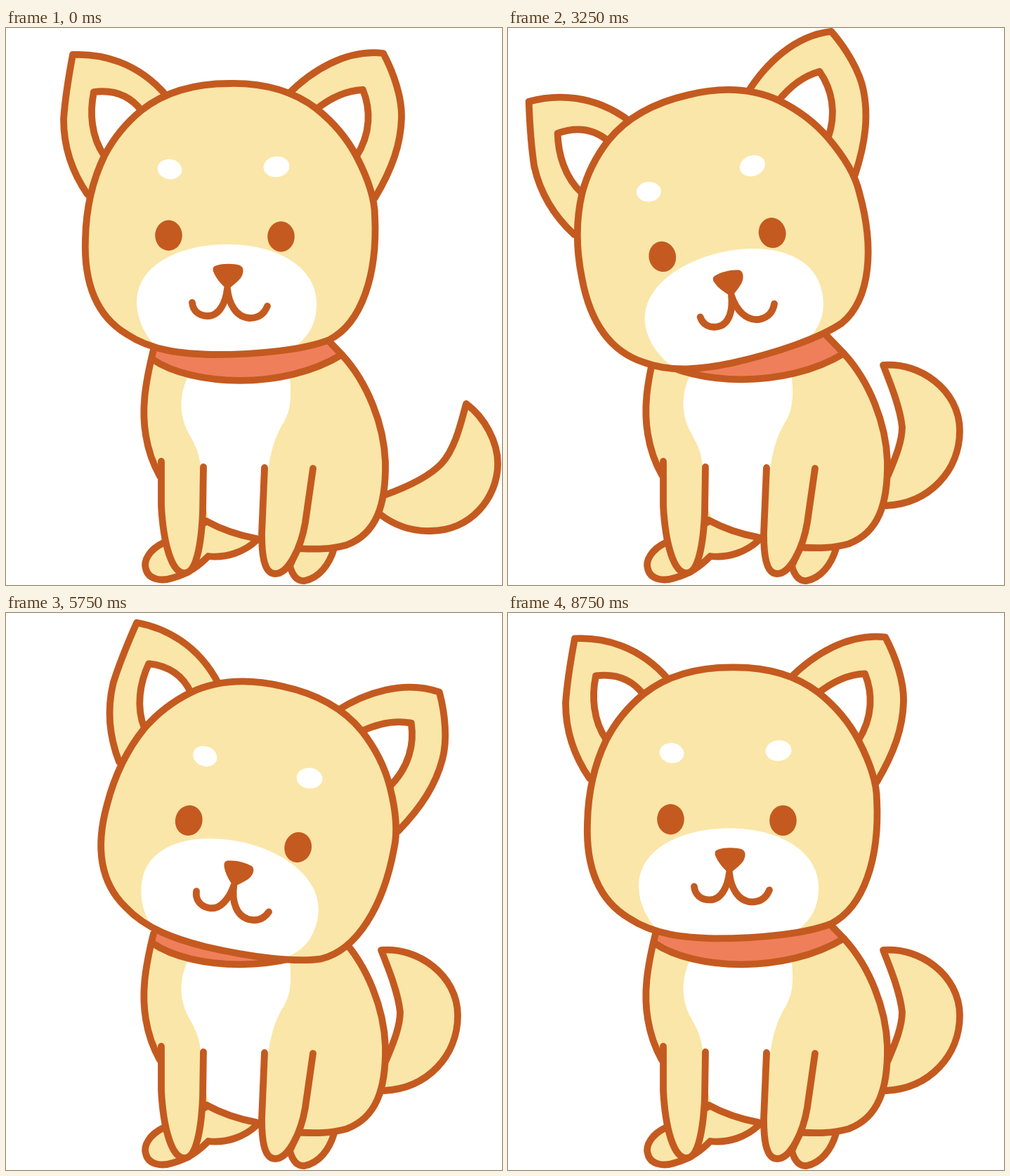
An HTML page with a canvas for the animation above (9000 ms loop, 706 px wide and 793 px high).

```html
<!DOCTYPE html>
<html lang="en">
<head>
<meta charset="utf-8">
<title>Puppy</title>
<style>
html, body { margin: 0; width: 100%; height: 100%; overflow: hidden; background: #fff; }
canvas { display: block; }
</style>
</head>
<body>
<canvas id="stage" width="706" height="793"></canvas>
<script>
const ctx = document.getElementById('stage').getContext('2d');
const LINE = '#c45a20', FUR = '#fae6a8', WHITE = '#fff', SCARF = '#ef7f5a';
const STEP = 250, LOOP = 9000;

const shape = d => new Path2D(d);

const tailDown = shape('M539 665C575 652 605 636 620 620C640 598 648 560 655 535C682 555 700 590 700 620C700 670 660 716 605 716C575 717 550 706 532 692');
const tailUp = shape('M541 637C550 615 561 590 561 568C558 540 545 508 534 480C585 475 643 515 643 573C643 630 600 677 538 680');

const feet = [
  shape('M285 703L224 733C205 742 195 758 199 770C203 786 222 788 237 783C260 777 275 765 288 752C315 755 340 745 356 730'),
  shape('M415 740L404 766C408 780 415 788 425 787C445 783 460 765 467 741')
];

const torso = shape('M210 455C197 510 193 545 199 580C203 605 210 622 219 638L285 702C305 713 330 722 357 727L413 741C440 742 460 743 485 736C527 720 541 680 540 618C538 565 515 505 478 465L452 438Z');
const torsoLines = [
  shape('M210 458C197 510 193 545 199 580C203 605 210 622 219 638'),
  shape('M285 702C305 713 330 722 357 727'),
  shape('M452 438L478 465C515 505 538 565 540 618C541 680 527 720 485 736C460 743 440 742 413 741')
];
const chest = shape('M258 498C246 525 247 553 260 577C270 595 275 605 277 625C279 660 283 684 291 703C310 714 335 722 357 727L366 720L372 640C376 600 385 578 395 562C408 540 405 520 404 495Z');
const scarf = shape('M210 455L209 472C265 510 395 516 478 465L452 438Z');
const scarfEdge = shape('M209 472C265 510 395 516 478 465');

const legs = [
  shape('M221 617L221 680C224 735 236 776 254 776C271 776 278 735 280 690L281 625'),
  shape('M368 626L364 720C364 745 366 777 383 777C402 777 420 740 426 704L437 627')
];

const ears = [
  shape('M116 237C92 202 82 165 82 130C84 100 89 70 95 38C135 36 187 48 228 96'),
  shape('M400 96C435 60 485 30 537 36C552 64 564 100 563 128C562 165 550 200 525 242')
];
const innerEars = [
  shape('M193 118C175 94 150 88 125 91C119 120 121 155 140 182'),
  shape('M440 117C462 99 486 89 508 88C519 115 520 150 498 184')
];
const skull = shape('M318 79C372 78 412 92 442 115C467 135 487 160 499 183C512 208 525 240 525 268C529 350 507 420 460 444C425 458 360 465 295 465C252 464 208 460 172 436C122 406 111 352 113 300C114 255 124 215 140 182C154 155 171 135 193 117C226 91 270 79 318 79Z');
const muzzle = shape('M215 455C195 435 186 412 186 388C188 335 250 308 315 308C385 308 442 340 442 392C442 420 432 438 412 453C370 462 270 466 215 455Z');
const nose = shape('M300 338C308 335 325 335 333 338C340 341 338 350 334 356C328 363 322 367 319 370Q315 373 311 369C304 362 299 356 296 349C293 342 295 339 300 338Z');
const mouth = shape('M265 391C266 402 274 410 287 410C304 410 313 390 315 371C317 392 327 412 347 413C360 413 368 406 372 396');

// Head poses: tilt in degrees and where the pivot lands
const PIVOT = [313.5, 166.5];
const CENTRE = { tilt: 0, x: 313.5, y: 166.5 };
const LEFT = { tilt: -12.8, x: 271.2, y: 183.3 };
const RIGHT = { tilt: 13.2, x: 369.5, y: 190.3 };

function fill(path, color) {
  ctx.fillStyle = color;
  ctx.fill(path);
}

function outline(path) {
  ctx.strokeStyle = LINE;
  ctx.stroke(path);
}

function part(path, color) {
  fill(path, color);
  outline(path);
}

function oval(x, y, rx, ry, color, turn = 0) {
  ctx.beginPath();
  ctx.ellipse(x, y, rx, ry, turn, 0, Math.PI * 2);
  ctx.fillStyle = color;
  ctx.fill();
}

function eye(x, bottom, open) {
  const ry = 21.7 * open;
  oval(x, bottom - ry, 19.3, ry, LINE);
}

function drawTorso(lift) {
  ctx.save();
  ctx.translate(0, -lift);
  fill(torso, FUR);
  fill(chest, WHITE);
  fill(scarf, SCARF);
  outline(scarfEdge);
  torsoLines.forEach(outline);
  ctx.restore();
}

function drawHead(pose, lift, open) {
  ctx.save();
  ctx.translate(pose.x, pose.y - lift);
  ctx.rotate(pose.tilt * Math.PI / 180);
  ctx.translate(-PIVOT[0], -PIVOT[1]);
  ears.forEach(p => part(p, FUR));
  innerEars.forEach(p => part(p, WHITE));
  fill(skull, FUR);
  fill(muzzle, WHITE);
  outline(skull);
  oval(233, 201, 17.5, 14.2, WHITE, 0.15);
  oval(385, 197.5, 18.5, 14.7, WHITE, -0.12);
  eye(231.5, 317, open);
  eye(391.5, 318.7, open);
  fill(nose, LINE);
  outline(mouth);
  ctx.restore();
}

function poseAt(t) {
  if (t >= 2500 && t < 5500) return LEFT;
  if (t >= 5500 && t < 7500) return RIGHT;
  return CENTRE;
}

function eyeOpen(step) {
  const off = Math.abs(step - 6);
  return off === 0 ? 0.45 : off === 1 ? 0.77 : 1;
}

function draw(time) {
  const step = Math.floor((time % LOOP) / STEP);
  const up = step % 2 === 1;
  const lift = up ? 1.6 : 0;
  ctx.fillStyle = WHITE;
  ctx.fillRect(0, 0, 706, 793);
  ctx.lineWidth = 9.8;
  ctx.lineCap = ctx.lineJoin = 'round';
  part(up ? tailUp : tailDown, FUR);
  feet.forEach(p => part(p, FUR));
  drawTorso(lift);
  legs.forEach(p => part(p, FUR));
  drawHead(poseAt(step * STEP), lift, eyeOpen(step));
}

const start = performance.now();
function tick() {
  draw(performance.now() - start);
  requestAnimationFrame(tick);
}
tick();
</script>
</body>
</html>
```
